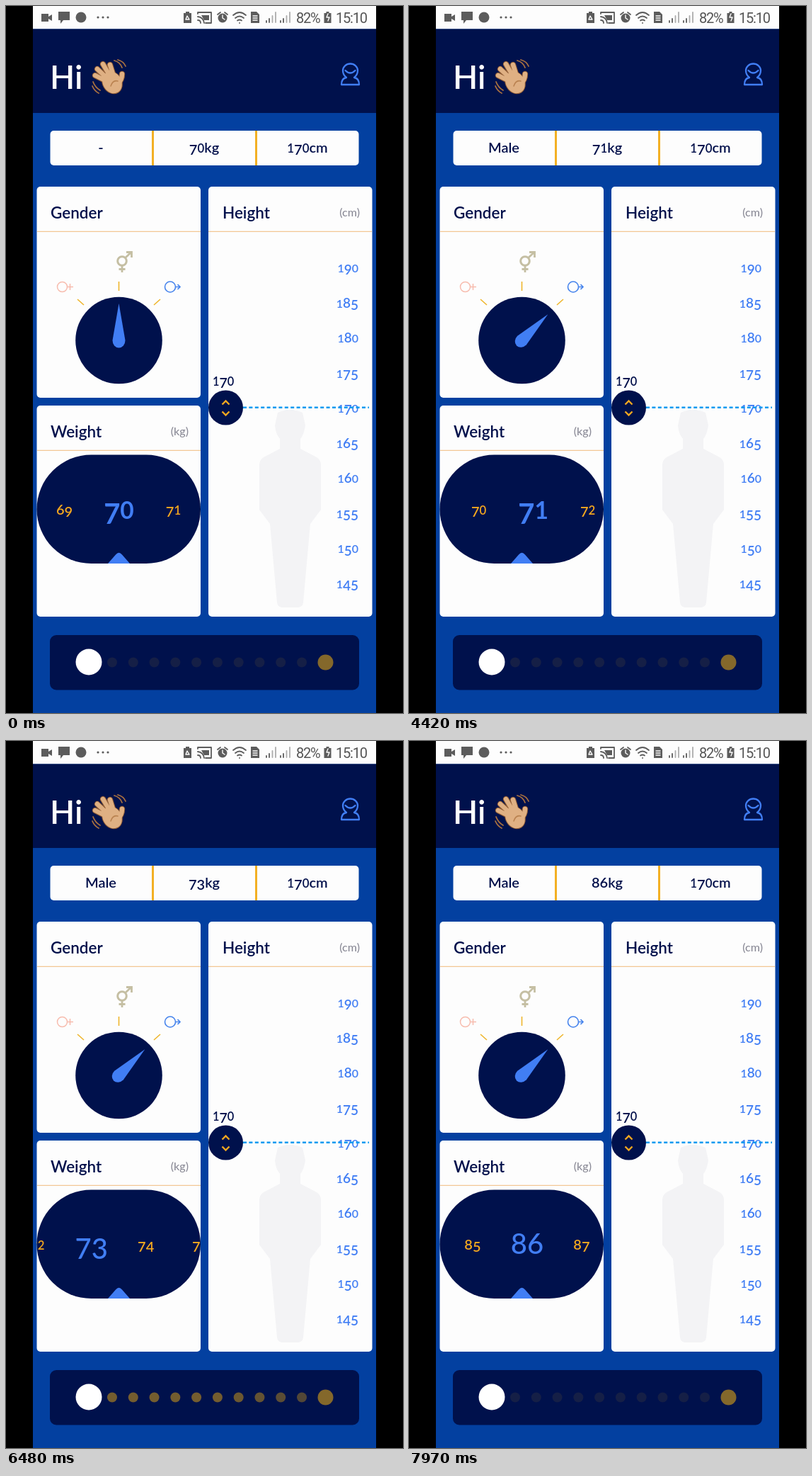
Write an HTML page that moves like this. It is 561 px wide and 998 px high and loops after 8 s.

```html
<!DOCTYPE html>
<html lang="en">
<head>
<meta charset="utf-8">
<title>Body profile</title>
<style>
  html, body { margin: 0; width: 100%; height: 100%; overflow: hidden; background: #000; }
  svg { display: block; width: 100vw; height: 100vh; font-family: Lato, sans-serif; }
  .status { font: 400 20px Roboto, sans-serif; letter-spacing: -1.2px; }
  .line { fill: none; stroke-linecap: round; stroke-linejoin: round; }
</style>
</head>
<body>
<svg viewBox="0 0 561 998">
  <defs><clipPath id="pillClip"><rect x="43.5" y="633.5" width="231.5" height="153.5" rx="77"/></clipPath></defs>
  <rect width="561" height="998"/>
  <rect x="38" width="485" height="998" fill="#0340a0"/>
  <rect x="38" width="485" height="32.5" fill="#fdfdfd"/>
  <rect x="38" y="32.5" width="485" height="118.5" fill="#00114c"/>

  <g fill="#5c5c5c">
    <path d="M50 11h10v4l5-3v9l-5-3v4H50zM74 8h16v12h-9l-4 5v-5h-3z"/>
    <circle cx="106" cy="16" r="7.5"/>
    <circle cx="130" cy="16" r="1.6"/><circle cx="137" cy="16" r="1.6"/><circle cx="144" cy="16" r="1.6"/>
    <path d="M254 8h5v2h3v14h-11V10h3zM449.500 10h3V8h4v2h3v14h-10z"/>
    <path d="M346 8h8l4 4v12h-12zM276 13h11v7h-7z"/>
    <circle cx="306" cy="17" r="6.5"/>
  </g>
  <g class="line" stroke="#5c5c5c" stroke-width="1.8">
    <path d="M271 11V9h19v15h-8M271 15q8 1 9 9M271 20q4 0 4 4M299 12l4-3M313 12l-4-3"/>
    <path d="M321 13q9-8 18 0M324 17q6-5 12 0M327 20.500q3-2 6 0M330 24h.1"/>
    <path d="M368 23v-2M372 23v-5M388 23v-2M392 23v-5"/>
    <path d="M376.500 23v-9M381 23V9M396.500 23v-9M401 23V9" opacity=".5"/>
    <path d="M306 13v4l3 2M349 14h6M349 17h6M349 20h6M256 14l-2 5h5zM455 11l-2 5h4l-2 5" stroke="#fdfdfd" stroke-width="1.4"/>
  </g>
  <text class="status" x="410" y="24" fill="#555">82%</text>
  <text class="status" x="466" y="24" fill="#555">15:10</text>

  <g class="line">
    <g id="hand"></g>
    <path d="M153 77q8 2 11 10M158 76q8 2 11 9M123 107q3 8 10 12M122 113q3 7 9 10" stroke="#a9713f" stroke-width="1.8"/>
    <path d="M481 101q-5-4-5-10a10.300 9.300 0 0 1 21 0q0 6-5 10 7 1 7 10h-25q0-9 7-10M479.500 91q7 7 14 0" stroke="#417ef4" stroke-width="2.3"/>
  </g>

  <g fill="#fdfdfd">
    <rect x="62.5" y="176" width="436" height="49" rx="5"/>
    <rect x="43.5" y="255" width="231.5" height="298" rx="5"/>
    <rect x="43.5" y="564" width="231.5" height="298" rx="5"/>
    <rect x="286" y="255" width="231.5" height="607" rx="5"/>
  </g>
  <path d="M207.500 176v49M353.500 176v49" stroke="#f3b024" stroke-width="3"/>
  <path d="M44 318.300h231M286 318.300h231M44 627.300h231" stroke="#f3c794" stroke-width="1.3"/>

  <g fill="none">
    <path d="M168.500 355.500L177 347.500M170 347.500h7.500v7.500M164 367v9M159.500 371.500h9" stroke="#c5bfa3" stroke-width="2.8"/>
    <circle cx="164" cy="360" r="6.3" stroke="#c5bfa3" stroke-width="3"/>
    <g stroke="#f7bcae" stroke-width="1.5"><circle cx="79.500" cy="396.500" r="7"/><path d="M87 396.500h8M90.500 392v9"/></g>
    <g stroke="#4583ec" stroke-width="1.6"><circle cx="232" cy="396.500" r="7.5"/><path d="M239.500 396.500h6M242.500 393l3.500 3.500-3.500 3.500"/></g>
    <path d="M159.500 389v13M101 414l9 8M218 414l-9 8" stroke="#efb62d" stroke-width="1.6"/>
  </g>
  <circle cx="159.500" cy="472" r="61.3" fill="#00114c"/>
  <path id="needle" d="M159.500 420L168.500 472A9 10.500 0 0 1 150.500 472Z" fill="#417ef4"/>

  <rect x="43.5" y="633.5" width="231.5" height="153.5" rx="77" fill="#00114c"/>
  <path d="M144 787L155 774.500Q159.500 769 164 774.500L175 787Z" fill="#417ef4"/>
  <g id="weights" clip-path="url(#pillClip)"></g>

  <path fill="#f3f3f5" d="M384 574Q401 566 419 574L423 592Q421 605 416 611V625L439 637Q445 641 445 648V711L430 731 420 842Q419 849 412 849H391Q384 849 383 842L373 731 358 711V648Q358 641 364 637L387 625V611Q381 604 380 592Z"/>
  <g id="labels"></g>
  <path d="M335 566.700h178" stroke="#0b9af0" stroke-width="2.6" stroke-dasharray="5 3.4"/>
  <circle cx="310.500" cy="567" r="24.500" fill="#00114c"/>
  <path d="M305.500 562.500l5-5 5 5M305.500 572.500l5 5 5-5" fill="none" stroke="#f3a81f" stroke-width="2.4"/>
  <g id="summary"></g>

  <rect x="62" y="888" width="437" height="77.5" rx="9" fill="#00114c"/>
  <circle cx="117" cy="926" r="18.500" fill="#fff"/>
  <g id="dots" fill="#84682b"></g>
  <circle cx="451.500" cy="926.500" r="11" fill="#84682b"/>
</svg>
<script>
const $ = id => document.getElementById(id);
const NAVY = '#03104b', BLUE = '#417ef4', ORANGE = '#f3a81f';
const clamp = v => Math.max(0, Math.min(1, v));

// Old-style figures: 0-2 are small, 3 4 5 7 9 hang below the baseline.
function oldStyle(str, size) {
  let level = 0;
  return [...str].map(ch => {
    const next = '34579'.includes(ch) ? size * .17 : 0;
    const dy = next - level;
    level = next;
    return `<tspan dy="${dy}" font-size="${'012'.includes(ch) ? size * .84 : size}">${ch}</tspan>`;
  }).join('');
}

function text(x, y, size, str, fill = NAVY, anchor = 'start', weight = 600) {
  const body = /\d/.test(str) ? oldStyle(str, size) : str;
  return `<text x="${x}" y="${y}" font-size="${size}" fill="${fill}" text-anchor="${anchor}" font-weight="${weight}">${body}</text>`;
}

const heights = Array.from({ length: 10 }, (_, i) =>
  text(498, 376 + i * 49.56, 19, String(190 - i * 5), BLUE, 'end')).join('');
$('labels').innerHTML = heights +
  text(62, 117, 46, 'Hi', '#fdfdfd') +
  text(63, 300, 22.5, 'Gender') + text(63, 608.5, 22.5, 'Weight') + text(306, 300, 22.5, 'Height') +
  text(500, 297, 16, '(cm)', '#8b8b97', 'end', 500) + text(258, 606, 16, '(kg)', '#8b8b97', 'end', 500) +
  text(292, 536, 19.5, '170');

const fingers = 'M142 106L126 98M143 102L129 89M147 99L137 82M152 99L147 83M158 110Q164 104 164 96';
const palm = '<ellipse cx="150" cy="108" rx="13" ry="16" transform="rotate(-30 150 108)"';
$('hand').innerHTML =
  `${palm} fill="#dfb083" stroke="#8f5c35" stroke-width="2"/>` +
  `<path d="${fingers}" stroke="#8f5c35" stroke-width="8.4"/>` +
  `<path d="${fingers}" stroke="#dfb083" stroke-width="6.4"/>` +
  `${palm} fill="#dfb083"/>` +
  '<path d="M148 113Q151 104 158 106" stroke="#b98250" stroke-width="1.500"/>';

$('dots').innerHTML = Array.from({ length: 10 }, (_, i) =>
  `<circle cx="${150 + i * 29.78}" cy="926.500" r="7"/>`).join('');
const dots = [...$('dots').children];

// Eased step from 0 to 1 between two times.
function ease(t, from, to) {
  const p = clamp((t - from) / (to - from));
  return p * p * (3 - 2 * p);
}
const easeOut = (t, from, to) => 1 - (1 - clamp((t - from) / (to - from))) ** 2;

// Two short drags, then a long fling that slows down at 86.
function weightAt(t) {
  if (t < 5000) return 70 + .79 * easeOut(t, 4210, 4420) + .21 * ease(t, 4520, 4700);
  if (t < 6270) return 71 + .83 * easeOut(t, 5060, 5220) + .17 * ease(t, 5220, 5450);
  if (t < 6480) return 72 + 1.49 * ((t - 6270) / 210) ** 2;
  const left = t < 6950 ? 3.537 - (t - 6480) * .00202 : 2.587 - (t - 6950) * .00223;
  return 86 - Math.max(0, left) ** 2;
}

// Phase of the dot wave; it rests at first and stalls once.
function wavePhase(t) {
  if (t < 1250) return -1;
  if (t < 3530) return (t - 1250) % 900;
  if (t < 4210) return 480;
  return (t - 3620) % 900;
}

function dotGlow(u, i) {
  const rise = clamp((u - i * 10) / 110);
  const fade = clamp(1 - (u - 280 - i * 36) / 380);
  return rise * fade * clamp((700 - u) / 60);
}

function draw(t) {
  // The selection switches just after the halfway point.
  const weight = weightAt(t), selected = Math.floor(weight + .4);
  $('needle').setAttribute('transform', `rotate(${45 * ease(t, 1840, 2160)} 159.5 472)`);
  $('summary').innerHTML =
    text(134, 207, 20, t < 1840 ? '-' : 'Male', NAVY, 'middle') +
    text(280, 207, 20, selected + 'kg', NAVY, 'middle') +
    text(426, 207, 20, '170cm', NAVY, 'middle');

  let row = '';
  for (let n = selected - 2; n <= selected + 2; n++) {
    const x = 159.5 + (n - weight) * 77;
    row += n === selected
      ? text(x, 724, 40, String(n), BLUE, 'middle', t < 6270 ? 700 : 500)
      : text(x, 718, 20, String(n), ORANGE, 'middle');
  }
  $('weights').innerHTML = row;

  const phase = wavePhase(t);
  dots.forEach((dot, i) => dot.setAttribute('opacity', .16 + .72 * dotGlow(phase, i)));
}

const start = performance.now();
function tick() {
  draw((performance.now() - start) % 8000);
  requestAnimationFrame(tick);
}
tick();
</script>
</body>
</html>
```
